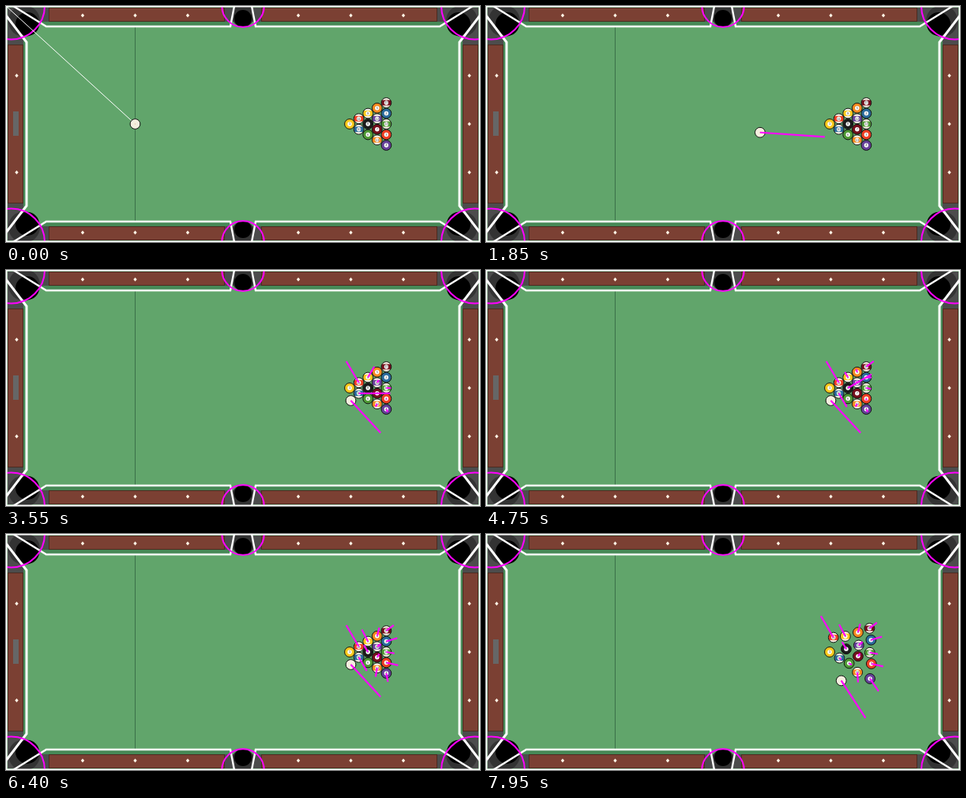
Animation of 600 by 300 pixels, one loop 8 s. Source, as an HTML page with a canvas:

```html
<!DOCTYPE html>
<html>
<head>
<meta charset="utf-8">
<style>
html, body { margin: 0; width: 100%; height: 100%; overflow: hidden; }
canvas { display: block; }
</style>
</head>
<body>
<canvas id="c" width="600" height="300"></canvas>
<script>
const W = 600, H = 300, LOOP = 8000, STEP = 50, R = 6.4;
const SHOT = 1500, IMPACT = 2250, SETTLED = 7000;
const ctx = document.getElementById('c').getContext('2d');
const table = document.createElement('canvas');
table.width = W;
table.height = H;

// Yellow, blue, red, purple, orange, green, maroon, black
const COLORS = ['#f9c91c', '#2a6c9c', '#ee4023', '#66419a',
                '#f68b1f', '#4f9a35', '#75101c', '#1c1c1c'];

// Columns of the rack, in the order their contacts are solved
const RACK = [[1], [11, 10], [9, 8, 6], [13, 7, 12, 5], [4, 3, 14, 2, 15]];
const START = { x: 163.5, y: 150 };
const HIT = { x: 436.5, y: 166 };

const lerp = (a, b, k) => a + (b - a) * k;
const ramp = (t, a, b) => Math.min(1, Math.max(0, (t - a) / (b - a)));

function makeBalls() {
  const balls = RACK.flatMap((column, col) => column.map((n, j) => ({
    n, col, vx: 0, vy: 0,
    x: 435 + 11.6 * col,
    y: 150 + (j - col / 2) * 13.5 * (col < 3 ? 1 : -1)
  })));
  balls.push({ n: 0, col: -1, ...HIT, vx: 77.5, vy: 4.6 });
  return balls;
}

// Elastic hit between two touching balls; false if they do not approach
function collide(a, b) {
  const dx = b.x - a.x, dy = b.y - a.y, d = Math.hypot(dx, dy);
  if (a === b || d > 14) return false;
  const nx = dx / d, ny = dy / d;
  const p = (a.vx - b.vx) * nx + (a.vy - b.vy) * ny;
  if (p < 1) return false;
  a.vx -= p * nx;
  a.vy -= p * ny;
  b.vx += p * nx;
  b.vy += p * ny;
  return true;
}

// Velocities of all balls after each collision of the break
function solveBreak(balls) {
  const log = [];
  const save = () => log.push(balls.map(b => [b.vx, b.vy]));

  // The shock runs forward through the rack, then the rest settles
  function push(a) {
    for (const b of balls) {
      if (b.col >= a.col && collide(a, b)) {
        save();
        push(b);
      }
    }
  }
  push(balls[balls.length - 1]);

  for (let pass = 0, busy = true; busy && pass < 20; pass++) {
    busy = false;
    balls.forEach((a, i) => balls.slice(i + 1).forEach(b => {
      if (collide(a, b)) {
        save();
        busy = true;
      }
    }));
  }
  return log;
}

const balls = makeBalls();
const log = solveBreak(balls);
const last = log[log.length - 1];

function disc(g, x, y, r, fill) {
  g.fillStyle = fill;
  g.beginPath();
  g.arc(x, y, r, 0, 7);
  g.fill();
}

function ring(g, x, y, r, color, width) {
  g.strokeStyle = color;
  g.lineWidth = width;
  g.beginPath();
  g.arc(x, y, r, 0, 7);
  g.stroke();
}

function line(g, points, color, width) {
  g.strokeStyle = color;
  g.lineWidth = width;
  g.beginPath();
  points.forEach(p => g.lineTo(p[0], p[1]));
  g.stroke();
}

function poly(g, points, fill) {
  g.fillStyle = fill;
  g.beginPath();
  points.forEach(p => g.lineTo(p[0], p[1]));
  g.fill();
}

function diamond(g, x, y) {
  poly(g, [[x, y - 2.5], [x + 2.2, y], [x, y + 2.5], [x - 2.2, y]], '#fff4e6');
}

function rail(g, x, y, w, h) {
  g.fillStyle = '#7b4033';
  g.fillRect(x, y, w, h);
  g.strokeStyle = '#4c2a20';
  g.lineWidth = 1;
  g.strokeRect(x + 0.5, y + 0.5, w - 1, h - 1);
}

// One quarter of the table, mirrored into the four corners
function quarter(g) {
  const cushion = '#468956', metal = '#4c4c4c', shade = '#333';
  poly(g, [[40, 19], [286, 19], [284, 26], [51, 26]], cushion);
  poly(g, [[21, 36], [26, 46], [26, 151], [21, 151]], cushion);
  rail(g, 54, 2, 223, 18);
  rail(g, 2, 49, 20, 102);

  poly(g, [[2, 2], [54, 2], [54, 20], [43, 20], [22, 38], [22, 49], [2, 49]], metal);
  disc(g, 23, 19, 20, shade);
  disc(g, 27, 23, 15, '#000');
  g.fillStyle = metal;
  g.fillRect(277, 2, 24, 18);
  disc(g, 300, 12, 14.5, shade);
  disc(g, 300, 16, 11, '#000');

  line(g, [[9, 0], [51, 26], [284, 26], [289, 0]], '#fff', 2.4);
  line(g, [[0, 12], [26, 46], [26, 151]], '#fff', 3);
  for (let i = 0; i < 3; i++) diamond(g, 97 + 66.5 * i, 12);
  diamond(g, 13.5, 88.5);
  ring(g, 6.5, 0, 42.5, '#f0f', 2);
  ring(g, 300, 0, 26.7, '#f0f', 2);
}

function buildTable() {
  const g = table.getContext('2d');
  g.fillStyle = '#61a56b';
  g.fillRect(0, 0, W, H);
  line(g, [[163.5, 27], [163.5, 273]], '#3a7048', 1);
  for (const sx of [1, -1]) {
    for (const sy of [1, -1]) {
      g.save();
      g.translate(sx < 0 ? W : 0, sy < 0 ? H : 0);
      g.scale(sx, sy);
      g.beginPath();
      g.rect(0, 0, W / 2, H / 2);
      g.clip();
      quarter(g);
      g.restore();
    }
  }
  diamond(g, 586.5, 150);
  g.fillStyle = '#666';
  g.fillRect(9, 134, 7, 31);
  g.strokeStyle = '#fff';
  g.lineWidth = 2;
  g.strokeRect(0.5, 0.5, W - 1, H - 1);
}

function drawBall(n, x, y) {
  const color = n ? COLORS[(n - 1) % 8] : '#f5efdf';
  disc(ctx, x, y, R, n > 8 ? '#f7f1e4' : color);
  if (n > 8) {
    ctx.save();
    ctx.beginPath();
    ctx.arc(x, y, R, 0, 7);
    ctx.clip();
    ctx.fillStyle = color;
    ctx.fillRect(x - R, y - 3.4, 2 * R, 6.8);
    ctx.restore();
  }
  if (n) {
    disc(ctx, x, y, 2.7, '#fff');
    ctx.fillStyle = '#333';
    ctx.fillText(n, x, y + 0.2);
  } else {
    disc(ctx, x, y, 0.8, '#e3c6ae');
  }
  ring(ctx, x, y, R, '#111', 1);
}

function aimPoint(t) {
  if (t < 1100) {
    const k = ramp(t, 0, 850), e = k * k * (3 - 2 * k);
    return [42 * e, 147 * e];
  }
  const k = ramp(t, 1050, 1400);
  return [lerp(42, 63, k), lerp(147, 144, k)];
}

// Position and velocity of one ball at time t
function pose(ball, i, t) {
  if (t < IMPACT) {
    if (ball.n) return [ball.x, ball.y, 0, 0];
    const k = t <= SHOT ? 0 : Math.min(1, (t - SHOT) / 521);
    const len = t <= SHOT ? 0 : lerp(90, 78, k);
    return [lerp(START.x, HIT.x, k), lerp(START.y, HIT.y, k), len, len * 0.068];
  }
  const k = Math.floor(ramp(t, IMPACT, SETTLED) * (log.length - 1));
  const drift = 0.05 * ramp(t, 6400, 7200) + 0.38 * ramp(t, 7200, 7950);
  return [ball.x + last[i][0] * drift, ball.y + last[i][1] * drift, ...log[k][i]];
}

function draw(t) {
  ctx.drawImage(table, 0, 0);
  ctx.font = '4px "Liberation Sans", Arial, sans-serif';
  ctx.textAlign = 'center';
  ctx.textBaseline = 'middle';

  if (t <= SHOT) line(ctx, [aimPoint(t), [START.x, START.y]], '#fff', 1);
  const poses = balls.map((b, i) => pose(b, i, t));
  poses.forEach(([x, y], i) => drawBall(balls[i].n, x, y));
  for (const [x, y, vx, vy] of poses) {
    if (vx || vy) line(ctx, [[x, y], [x + vx, y + vy]], '#f0f', 2.2);
  }
}

function frame() {
  const t = performance.now() % LOOP;
  draw(Math.floor(t / STEP) * STEP);
  requestAnimationFrame(frame);
}

buildTable();
frame();
</script>
</body>
</html>
```
